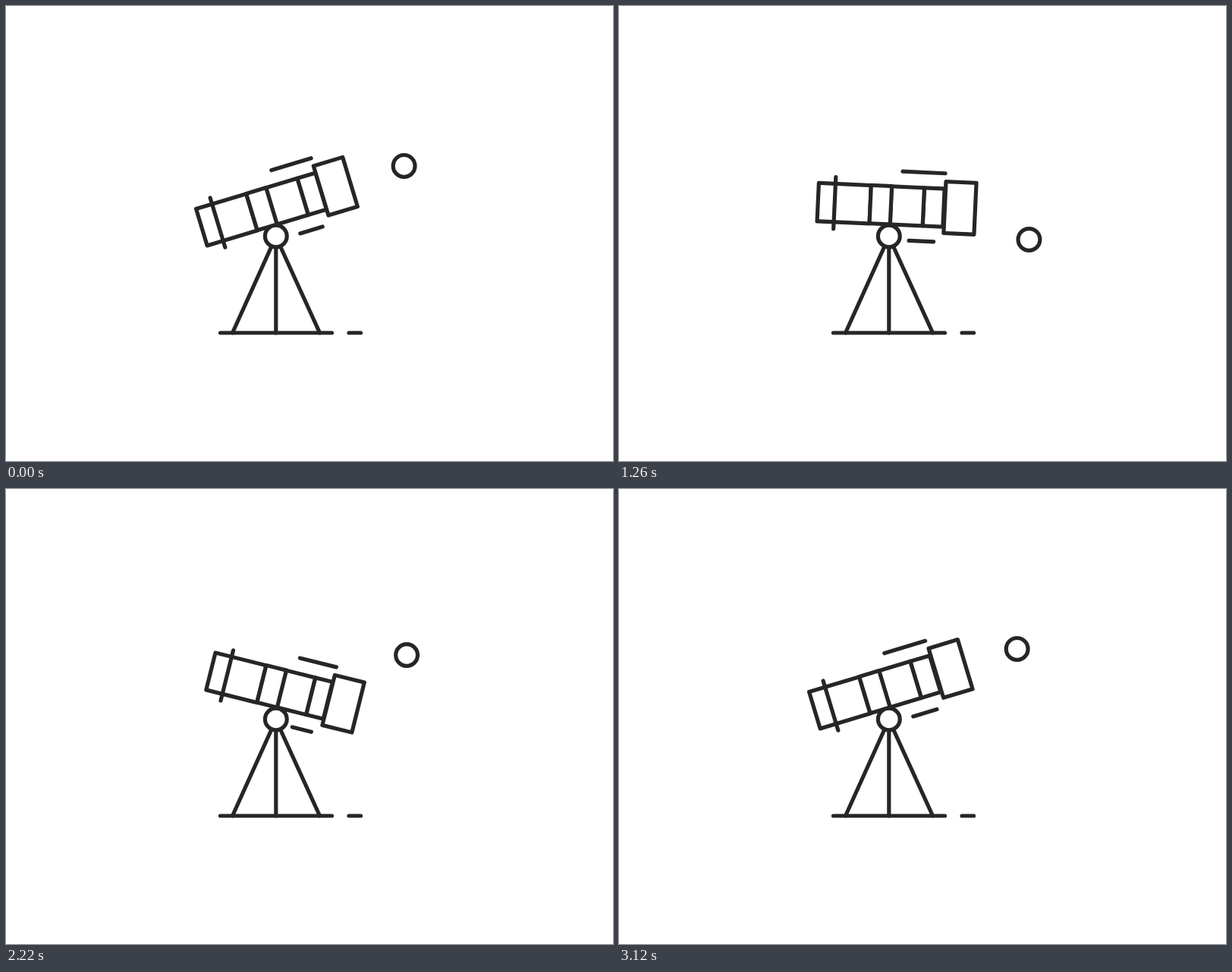
An HTML page with a canvas for the animation above (3150 ms loop, 800 by 600 pixels).

```html
<!DOCTYPE html>
<html lang="en">
<head>
<meta charset="utf-8">
<title>Telescope</title>
<style>
  html, body { margin: 0; width: 100%; height: 100%; overflow: hidden; background: #fff; }
  canvas { display: block; }
</style>
</head>
<body>
<canvas id="stage" width="800" height="600"></canvas>
<script>
const ctx = document.getElementById('stage').getContext('2d');
const INK = '#282526';
const STEP = 30, STEPS = 105;
const PIVOT = { x: 357, y: 288 };
const RAD = Math.PI / 180;
const UP = -16.8, DOWN = 14, SWING = DOWN - UP;
const SECOND = 53.5; // steps between the two zoom cycles

// Smooth 0..1 ramp between two moments
function ramp(n, from, to) {
  const t = Math.min(1, Math.max(0, (n - from) / (to - from)));
  return t * t * (3 - 2 * t);
}

// 0..1 move that passes its end by `over`, then settles
function swing(n, start, peak, end, over) {
  return (1 + over) * ramp(n, start, peak) - over * ramp(n, peak, end);
}

// Pull a part in and let it out again, twice per loop
function pull(n, size, inA, inB, outA, outB) {
  const once = m => ramp(m, inA, inB) - ramp(m, outA, outB);
  return size * (once(n) + once(n - SECOND));
}

function line(x1, y1, x2, y2) {
  ctx.beginPath();
  ctx.moveTo(x1, y1);
  ctx.lineTo(x2, y2);
  ctx.stroke();
}

function box(x1, y1, x2, y2) {
  ctx.beginPath();
  ctx.rect(x1, y1, x2 - x1, y2 - y1);
  ctx.fill();
  ctx.stroke();
}

function ring(x, y) {
  ctx.beginPath();
  ctx.arc(x, y, 14.4, 0, 2 * Math.PI);
  ctx.fill();
  ctx.stroke();
}

function drawScope(n) {
  const turn = swing(n, 34, 48, 51, 0.04) - swing(n, 88.5, 102.5, 104, 0.04);
  const head = 71.3 - pull(n, 24, -1.9, 7, 8.7, 27.5);
  const topEnd = 69.9 - pull(n, 23, -1.2, 6.4, 9.25, 26.8);
  const lowEnd = 58.6 - pull(n, 28, -1.4, 7.5, 9.9, 25.5);
  const band = 43.2 - pull(n, 16.5, 0, 7.4, 10.65, 24.7);

  ctx.save();
  ctx.translate(PIVOT.x, PIVOT.y);
  ctx.rotate((UP + SWING * turn) * RAD);
  box(band, -50.3, topEnd, 0);
  box(0, -50.3, band, 0);
  box(-96, -50.3, -27, 0.2);
  box(-27, -50.5, 0.3, 0);
  line(-74, -59, -74, 9.2);
  box(head, -59.8, head + 40.1, 8.2);
  line(13.8, -70.5, topEnd, -70.5);
  line(26, 20.3, lowEnd, 20.3);
  ctx.restore();
}

function drawStand() {
  line(349.5, 318, 298.5, 431);
  line(362, 318, 413.5, 431);
  line(355.8, 318, 355.8, 431);
  line(282.5, 431, 429.5, 431);
  line(452, 431, 467.5, 431);
  ring(355.8, 303.5);
}

function drawPlanet(n) {
  const move = swing(n, 10, 26, 31, 0.08) - swing(n, 62, 78, 83, 0.08);
  const a = (-24.7 + 30.9 * move) * RAD;
  ring(PIVOT.x + 184.5 * Math.cos(a), PIVOT.y + 184.5 * Math.sin(a));
}

function draw(n) {
  ctx.fillStyle = '#fff';
  ctx.fillRect(0, 0, 800, 600);
  ctx.strokeStyle = INK;
  ctx.lineWidth = 5.2;
  ctx.lineCap = ctx.lineJoin = 'round';
  drawScope(n);
  drawStand();
  drawPlanet(n);
}

const begin = performance.now();
function tick() {
  const t = Math.max(0, performance.now() - begin);
  draw(Math.floor(t / STEP) % STEPS);
  requestAnimationFrame(tick);
}
tick();
</script>
</body>
</html>
```
